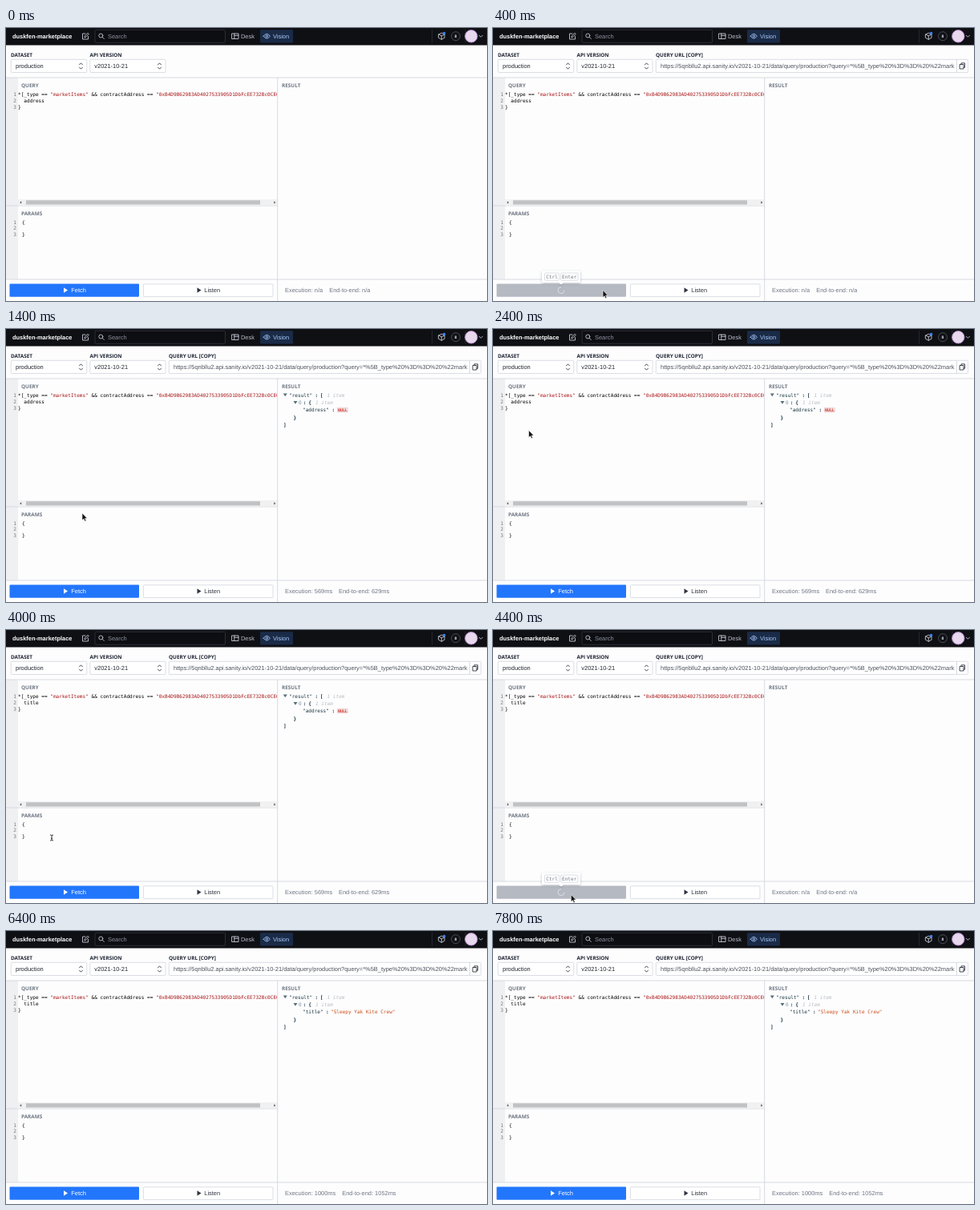
Recreate the animation shown at these times as an HTML page. Size 600 px wide and 341 px high, loop 8 s.

```html
<!DOCTYPE html>
<html lang="en">
<head>
<meta charset="utf-8">
<title>Query console</title>
<style>
html, body { margin: 0; width: 100%; height: 100%; overflow: hidden; background: #fdfdfe; }
svg { display: block; width: 600px; height: 341px; }
text { font: 7.44px "Liberation Sans", Arial, sans-serif; text-rendering: geometricPrecision; white-space: pre; }
.label { font: 700 6.4px "Open Sans", "Noto Sans", sans-serif; fill: #1c2230; }
.pane { fill: #6e7683; }
.mono, .mono tspan { font: 6.08px "DejaVu Sans Mono", monospace; }
.num { fill: #777; text-anchor: end; }
.str { fill: #a81515; }
.count { font-style: italic !important; fill: #b9bdc2; }
.bold { font-weight: 700 !important; }
.field { fill: #fff; stroke: #cdd1da; stroke-width: .7; }
.line { fill: none; stroke: #cfd2d8; stroke-width: .8; }
.icon { fill: none; stroke: #c3c7d3; stroke-width: .9; stroke-linejoin: round; stroke-linecap: round; }
.dark { stroke: #30343f; }
.muted { fill: #6e7683; }
.json { fill: #17323c; }
</style>
</head>
<body>
<svg viewBox="0 0 600 341" xmlns="http://www.w3.org/2000/svg">
  <defs>
    <clipPath id="editor"><path d="M15 62H338V213H15z"/></clipPath>
    <filter id="shadow" x="-20%" y="-40%" width="140%" height="200%">
      <feDropShadow dx="0" dy="1" stdDeviation="1.4" flood-color="#39445c" flood-opacity=".35"/>
    </filter>
    <path id="sort" class="icon dark" d="M-2-1.6L0-3.7 2-1.6M-2 1.6L0 3.7 2 1.6"/>
    <path id="fold" fill="#586e75" d="M-2.5-1.6H2.5L0 2.2z"/>
  </defs>

  <!-- header -->
  <path fill="#0f1014" d="M0 0H600V21.5H0z"/>
  <text class="bold" x="8" y="12.8" fill="#fff">duskfen-marketplace</text>
  <path class="icon" d="M99 7H95.5V14H102.5V10.5M98 11.5L98.5 9.8 102 6.2 103.3 7.5 99.8 11z"/>
  <rect x="111" y="2.3" width="162.500" height="16" rx="1.3" fill="#0d0e12" stroke="#333641" stroke-width=".8"/>
  <g class="icon"><circle cx="118.300" cy="9.500" r="2.500"/><path d="M120.200 11.400L122.300 13.500"/></g>
  <text x="127" y="12.900" fill="#8c91a0">Search</text>
  <path class="icon" d="M282 7H290V13.500H282zM284.800 7V13.500M284.800 9.300H290"/>
  <text x="293" y="12.900" fill="#b6bbc8">Desk</text>
  <rect x="317" y="2.200" width="41" height="16.200" rx="1.300" fill="#1a2b48"/>
  <g class="icon" style="stroke:#a9c8f8"><path d="M321.300 10.200Q325.300 4.300 329.300 10.200Q325.300 16 321.300 10.200z"/><circle cx="325.300" cy="10.200" r="1.200"/></g>
  <text x="333" y="12.900" fill="#a9c8f8">Vision</text>
  <path stroke="#2b2e37" stroke-width=".8" d="M531.500 2V18.500M573 2V18.500"/>
  <path class="icon" d="M539.700 8L543.300 6.200 547 8V12.300L543.300 14.300 539.700 12.300zM539.700 8L543.300 9.900 547 8M543.300 9.900V14.300"/>
  <circle cx="546.600" cy="6.500" r="1.700" fill="#3d82f6"/>
  <circle cx="561" cy="10.200" r="5.500" fill="#111217" stroke="#555963" stroke-width=".8"/>
  <text class="bold" x="561" y="12" style="font-size:5px" text-anchor="middle" fill="#e6e8ee">8</text>
  <circle cx="580.300" cy="10.300" r="7.700" fill="#e7d8ee" stroke="#bd8ed0" stroke-width=".9"/>
  <path class="icon" d="M590.400 9.300L592.400 11.300 594.400 9.300"/>

  <!-- settings row -->
  <text class="label" x="6" y="36">DATASET</text>
  <text class="label" x="104.500" y="36">API VERSION</text>
  <rect class="field" x="6.300" y="39.300" width="94.400" height="16.200" rx="1"/>
  <rect class="field" x="104.800" y="39.300" width="94.200" height="16.200" rx="1"/>
  <text x="12" y="50" fill="#20242e">production</text>
  <text x="110.300" y="50" fill="#20242e">v2021-10-21</text>
  <use href="#sort" x="93.500" y="47.500"/><use href="#sort" x="191.500" y="47.500"/>
  <g id="url">
    <text class="label" x="203" y="36">QUERY URL [COPY]</text>
    <rect class="field" x="203.300" y="39.300" width="389.200" height="16.200" rx="1"/>
    <text x="209" y="50" fill="#4b505c">https://5qnbllu2.api.sanity.io/v2021-10-21/data/query/production?query=*%5B_type%20%3D%3D%20%22mark</text>
    <path class="line" d="M578.500 39.500V55.500"/>
    <path class="icon dark" d="M582.500 45.500H587V51H582.500zM584 45.300V43.800H588.500V49.300H587.200"/>
  </g>

  <!-- panes -->
  <path fill="#eff0f2" d="M0 62H15V314H0z"/>
  <path class="line" d="M0 62H600M338.700 62V341M0 222H338.700M0 314H600"/>
  <text class="label pane" x="19" y="73.800">QUERY</text>
  <text class="label pane" x="19" y="233.500">PARAMS</text>
  <text class="label pane" x="344" y="73.800">RESULT</text>
  <g id="numbers"></g>
  <g clip-path="url(#editor)">
    <text class="mono" x="15" y="85">*[_type == <tspan class="str">"marketItems"</tspan> &amp;&amp; contractAddress == <tspan class="str">"0xB4D9B62983AD4027533905D1DbFcEE732Bc0CE0</tspan></text>
    <text class="mono" id="field" x="15" y="92.700"></text>
    <text class="mono" x="15" y="100.600">}</text>
  </g>
  <text class="mono" x="20" y="244.500">{</text>
  <text class="mono" x="20" y="260.300">}</text>
  <path fill="#f1f1f2" d="M15 214H338V221.600H15z"/>
  <path fill="#c1c2c4" d="M25 215.200H317V220.500H25z"/>
  <path fill="#50535a" d="M19.200 216.300V219.500L17.200 217.900zM334.300 216.300V219.500L336.300 217.900z"/>

  <!-- result tree -->
  <g id="tree" class="json">
    <use href="#fold" x="348.300" y="82"/>
    <text class="mono" x="353" y="84.800">"result"</text>
    <text class="mono bold" x="385.500" y="84.800">:</text>
    <text class="mono bold" x="391.800" y="84.800">[</text>
    <text class="mono count" x="400.500" y="84.800">1 item</text>
    <use href="#fold" x="361" y="91.500"/>
    <text class="mono" x="365" y="94" fill="#7d94b0">0</text>
    <text class="mono bold" x="370.800" y="94">:</text>
    <text class="mono bold" x="377.300" y="94">{</text>
    <text class="mono count" x="386" y="94">1 item</text>
    <g id="nullRow">
      <text class="mono" x="370" y="103.300">"address"</text>
      <text class="mono bold" x="406.500" y="103.300">:</text>
      <rect x="412.800" y="97.700" width="14" height="6.800" rx="1" fill="#f1dcdb"/>
      <text class="mono bold" x="414" y="103" style="font-size:4.900px" fill="#d33a35">NULL</text>
    </g>
    <g id="titleRow">
      <text class="mono" x="370" y="103.300">"title"</text>
      <text class="mono bold" x="399" y="103.300">:</text>
      <text class="mono" x="405" y="103.300" fill="#cb4b16">"Sleepy Yak Kite Crew"</text>
    </g>
    <text class="mono bold" x="358.500" y="113">}</text>
    <text class="mono bold" x="346" y="122.300">]</text>
  </g>

  <!-- footer -->
  <rect id="fetch" x="4.500" y="319.500" width="161.500" height="16.300" rx="1"/>
  <g id="fetchLabel" fill="#fff"><path d="M72 324.300V330.700L77 327.500z"/><text x="81.300" y="330.200">Fetch</text></g>
  <g id="spinner"><path d="M89 327.600A4 4 0 1 1 85 323.600" fill="none" stroke="#dfe2e7" stroke-width=".9"/></g>
  <rect class="field" x="171.400" y="319.800" width="161.600" height="15.800" rx="1"/>
  <path fill="#30343f" d="M238.500 324.300V330.700L243.500 327.500z"/>
  <text x="247.300" y="330.200" fill="#30343f">Listen</text>
  <text class="muted" id="execution" x="348" y="330.200"></text>
  <text class="muted" id="total" y="330.200"></text>

  <g id="tooltip">
    <path fill="#fff" filter="url(#shadow)" d="M62 303.300H108Q109 303.300 109 304.300V317Q109 318 108 318H88L85 320.300 82 318H62Q61 318 61 317V304.300Q61 303.300 62 303.300z"/>
    <rect class="field" x="64.500" y="306" width="18" height="9.200" rx="1"/>
    <rect class="field" x="84.500" y="306" width="21.500" height="9.200" rx="1"/>
    <text class="mono muted" x="66.300" y="312.800">Ctrl</text>
    <text class="mono muted" x="86" y="312.800">Enter</text>
  </g>

  <path id="arrow" fill="#111" stroke="#fff" stroke-width=".6" d="M0 0V9L2.100 7.200 3.500 10.300 5 9.600 3.600 6.600H6.300z"/>
  <path id="beam" fill="none" stroke="#222" stroke-width=".9" d="M-2-3.500Q0-3.500 0-2.500Q0-3.500 2-3.500M0-2.500V2.500M-2 3.500Q0 3.500 0 2.500Q0 3.500 2 3.500M-1 .8H1"/>
</svg>
<script>
const LOOP = 8000, STEP = 200;
const $ = id => document.getElementById(id);
const show = (id, on) => $(id).style.display = on ? "" : "none";
const within = (t, from, to) => t >= from && t < to;

// time, x, y, shape
const pointer = [
  [0, 0, 0, ""], [200, 114, 330, "arrow"], [400, 137, 327.5, "arrow"], [1000, 137, 327.5, "arrow"],
  [1200, 128, 313, "arrow"], [1400, 95, 230, "arrow"], [1800, 44.5, 126.5, "arrow"],
  [2400, 44.5, 126.5, "arrow"], [2600, 49, 91, "beam"], [3600, 49, 91, "beam"],
  [4000, 57, 259.5, "beam"], [4200, 92, 326, "arrow"], [4400, 97.3, 330.5, "arrow"],
  [4600, 97.3, 330.5, "arrow"], [4800, 97, 336, "arrow"], [5000, 97, 345, ""]
];

const lineNumbers = [85, 92.7, 100.6, 244.5, 252.4, 260.3];
$("numbers").innerHTML = lineNumbers
  .map((y, i) => `<text class="mono num" x="13" y="${y}">${i % 3 + 1}</text>`).join("");

function typed(t) {
  if (t < 2600) return "address";
  if (t < 3000) return "address".slice(0, t < 2800 ? 4 : 1);
  return "title".slice(0, Math.round((t - 2800) / 120));
}

function placePointer(t) {
  const i = pointer.findLastIndex(p => p[0] <= t);
  const [start, x, y, shape] = pointer[i];
  const [end, nx, ny] = pointer[i + 1] || [LOOP, x, y];
  const k = (t - start) / (end - start);
  for (const id of ["arrow", "beam"]) show(id, id === shape);
  if (shape) $(shape).setAttribute("transform", `translate(${x + (nx - x) * k} ${y + (ny - y) * k})`);
}

function render(now) {
  const t = Math.floor(now % LOOP / STEP) * STEP;
  const loading = within(t, 400, 800) || within(t, 4400, 5000);
  const hover = within(t, 200, 1200) || within(t, 4200, 5000);
  const first = within(t, 800, 4400), second = t >= 5000;

  show("url", t >= 400);
  show("tree", first || second);
  show("nullRow", first);
  show("titleRow", second);
  show("tooltip", within(t, 400, 1200) || within(t, 4400, 5000));
  show("fetchLabel", !loading);
  show("spinner", loading);
  $("spinner").setAttribute("transform", `rotate(${(t - 4400) * 0.72} 85 327.6)`);
  $("fetch").setAttribute("fill", loading ? "#b5b9c1" : hover ? "#205fca" : "#2276fc");
  $("field").textContent = "  " + typed(t);

  const [run, total] = first ? ["569ms", "629ms"] : second ? ["1000ms", "1052ms"] : ["n/a", "n/a"];
  $("execution").textContent = "Execution: " + run;
  $("total").textContent = "End-to-end: " + total;
  $("total").setAttribute("x", first ? 415 : second ? 419.2 : 403.2);
  placePointer(t);
}

const began = performance.now();
function tick() {
  render(performance.now() - began);
  requestAnimationFrame(tick);
}
tick();
</script>
</body>
</html>
```
